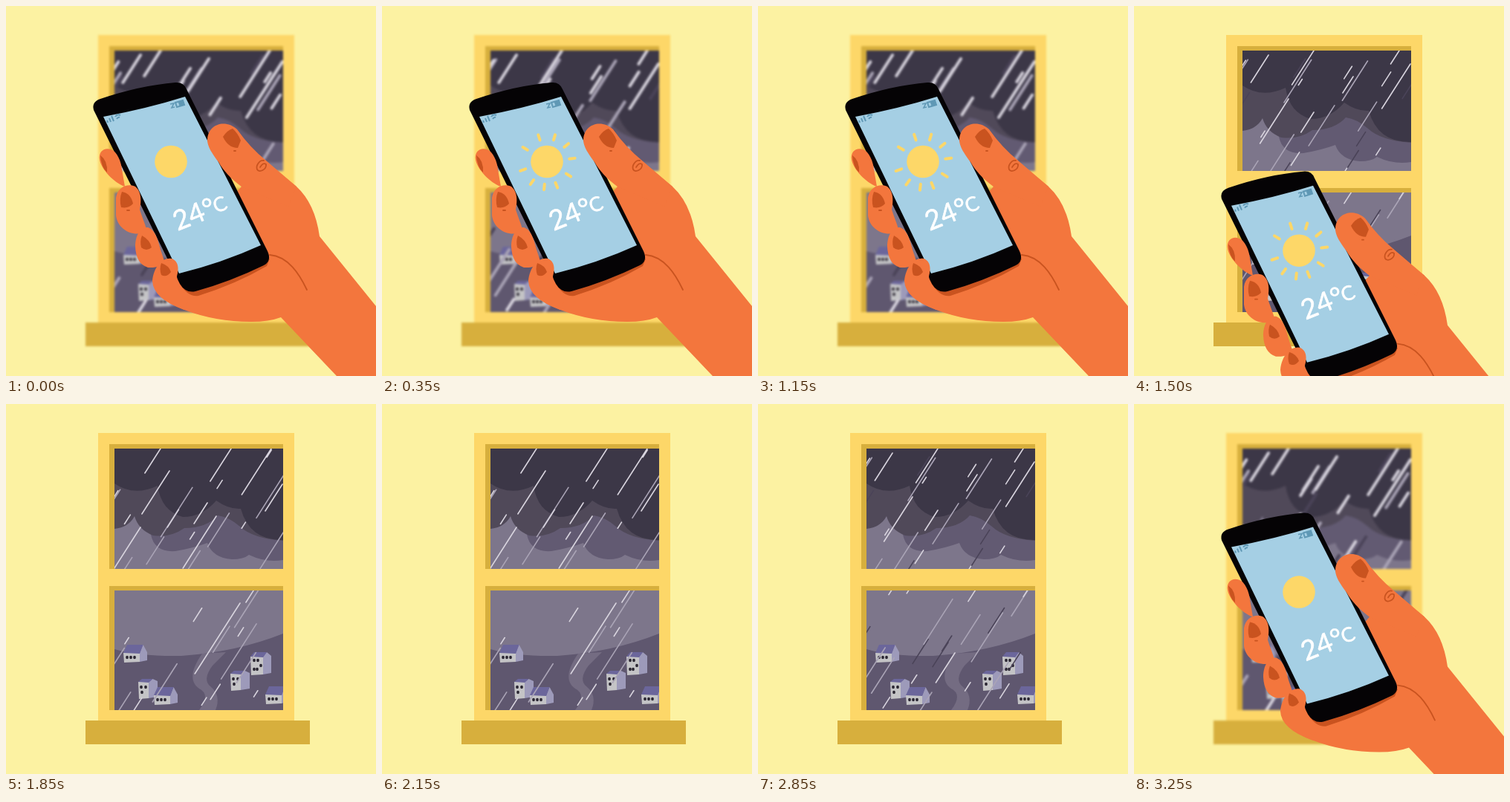
An HTML page that plays this animation: 498 px wide and 498 px high, repeating every 3300 ms.

```html
<!DOCTYPE html>
<html lang="en">
<head>
<meta charset="utf-8">
<title>Weather check</title>
<style>
  html, body { margin: 0; width: 100%; height: 100%; overflow: hidden; background: #fcf2a2; }
  svg { display: block; width: 100vw; height: 100vh; }
  text { font-family: Lato, "Open Sans", sans-serif; fill: #fff; stroke: #fff; stroke-width: .6; }
</style>
</head>
<body>
<svg viewBox="0 0 498 498">
  <defs>
    <clipPath id="glass"><path d="M146 60H373V222H146ZM146 251H373V412H146Z"/></clipPath>
    <filter id="soft" filterUnits="userSpaceOnUse" x="90" y="20" width="340" height="460" color-interpolation-filters="sRGB">
      <feGaussianBlur id="blur" stdDeviation="0"/>
    </filter>
  </defs>
  <rect width="498" height="498" fill="#fcf2a2"/>

  <g id="window">
    <path fill="#fdd768" d="M124 39H388V427H124Z"/>
    <path fill="#d7af3d" d="M139 54H373V222H139ZM139 245H373V412H139ZM107 426H409V458H107Z"/>
    <g clip-path="url(#glass)">
      <path fill="#7d768b" d="M146 60H373V412H146Z"/>
      <path fill="#625a72" d="M190 150L195 176Q200 200 228 198Q252 194 271 187Q278 207 304 209Q320 209 327 203Q350 214 373 210V130H240Z"/>
      <path fill="#504959" d="M146 60V168Q165 166 173 151Q178 169 198 177Q222 180 240 167Q270 167 285 150Q300 152 315 165Q332 181 373 184V60Z"/>
      <path fill="#3c3747" d="M146 60V107Q172 125 204 110Q209 144 238 152Q264 152 283 130Q300 142 316 141Q328 184 373 183V60Z"/>
      <path fill="#5f576f" d="M146 330Q180 340 236 339Q310 334 373 309V412H146Z"/>
      <path fill="#746c82" d="M264 336C250 356 246 373 260 383Q276 391 260 412H282Q290 392 275 380Q264 371 278 352L296 334Z"/>
      <g id="houses"></g>
      <g id="rain" fill="none" stroke-linecap="round">
        <path id="darkRain" stroke="#4a4358"/>
        <path id="dimRain" stroke="#aaa4b6"/>
        <path id="lightRain" stroke="#d8d4de"/>
      </g>
    </g>
  </g>

  <g id="hand">
    <path fill="#f3763d" d="M198 370Q204 395 240 409Q282 425 330 425Q354 425 370 419L445 498L700 768V645L498 404L422 310Q416 266 391 243L372 228L317 243L240 330Z"/>
    <path fill="#c9531f" d="M234 374Q245 392 259 390Q310 374 351 350L355 340Z"/>
    <path fill="#050305" d="M118 140Q115 129 127 125Q180 107 228 103Q239 102 243 112L352 330Q358 343 347 349Q302 371 255 384Q242 387 234 374Z"/>
    <path fill="#a5cfe4" d="M131 149Q190 138 241 122L343 322Q290 346 233 360Z"/>
    <g stroke="#5f98b5" stroke-width="2" fill="none">
      <path d="M137 157L136 154M141 156L139 151M145 155L142 148M147 149Q150 145 154 147M149 152Q151 149 153 150"/>
      <path d="M221 132L226 131L223 137L227 136" stroke-width="1.5"/>
      <path d="M228 130L238 127L240 133L230 136Z"/>
      <path d="M233 130L237 129L238 132L234 133Z" fill="#5f98b5"/>
    </g>
    <circle cx="222" cy="209.5" r="21.8" fill="#fdd768"/>
    <path id="rays" fill="none" stroke="#fdd768" stroke-width="4" stroke-linecap="round"/>
    <g transform="translate(231 303) rotate(-22)">
      <text font-size="37">24°</text>
      <text x="57" y="-2.5" font-size="27">C</text>
    </g>
    <g fill="#f3763d">
      <path d="M126 207C124 195 133 190 141 193C150 196 155 210 156 220L160 243C145 238 128 219 126 207Z"/>
      <path d="M148 258C150 243 165 238 174 243C183 250 182 264 180 274C184 287 190 299 189 304C170 312 150 300 148 282Z"/>
      <path d="M174 324C174 307 182 297 191 298C201 301 205 316 208 328L213 343Q209 353 191 352Q175 347 174 324Z"/>
      <path d="M197 370C199 350 211 338 223 340C234 344 232 357 230 364C231 377 238 386 248 390L240 409Q198 394 197 370Z"/>
      <path d="M318 244C302 232 293 222 286 210C277 198 271 189 271 180C272 158 296 152 311 166Q328 190 350 208L391 243L380 270Z"/>
    </g>
    <g fill="#c9531f">
      <path d="M127 201Q137 208 136 224Q128 217 127 201Z"/>
      <path d="M156 250Q168 252 171 266Q165 273 155 271Q152 260 156 250Z"/>
      <path d="M183 309Q194 315 196 325Q189 331 182 325Q180 316 183 309Z"/>
      <path d="M209 346Q219 349 222 358Q216 366 209 362Q206 354 209 346Z"/>
      <path d="M292 176Q298 167 305 165Q312 171 316 181L312 191Q299 191 292 176Z"/>
    </g>
    <path fill="none" stroke="#c9531f" stroke-width="1.8" stroke-linecap="round" d="M355 335C380 337 395 361 405 382M347 208C341 207 336 215 338 220C341 225 351 220 350 213Q346 210 342 217M307 195H309M163 275H166"/>
  </g>
</svg>
<script>
const LOOP = 3300;
const $ = id => document.getElementById(id);
const clamp = v => Math.min(1, Math.max(0, v));
const span = (t, from, to) => clamp((t - from) / (to - from));

function seeded(seed) {
  return () => (seed = (seed * 16807) % 2147483647) / 2147483647;
}

const line = (x, y, h) => `M${x} ${y}l${-.64 * h} ${h}`;

// Drops scattered evenly over both panes, one per grid cell.
function scatter(seed, cols, rows, shortest, longest) {
  const random = seeded(seed);
  let d = "";
  for (let i = 0; i < cols * rows; i++) {
    const x = 150 + (i % cols + random()) * 240 / cols;
    const y = 60 + (Math.floor(i / cols) + random()) * 340 / rows;
    d += line(x, y, shortest + random() * (longest - shortest));
  }
  return d;
}

// The main streaks of each rain picture: top x, top y, height.
const mainStreaks = [
  [[181,66,37], [242,60,46], [295,95,22], [357,60,18], [372,78,60], [242,143,27], [208,125,60], [265,335,40]],
  [[208,60,33], [220,90,58], [303,60,44], [357,60,62], [372,108,36], [271,133,28], [181,166,56], [283,151,70], [315,268,95]],
  [[181,66,37], [208,60,34], [273,71,44], [248,84,32], [355,60,62], [372,75,75], [356,90,12]]
];
const rain = mainStreaks.map((list, i) => ({
  light: list.map(s => line(...s)).join("") + scatter(731 + i * 977, 4, 4, 7, 24),
  dim: scatter(5209 + i * 613, 3, 5, 35, 75),
  dark: scatter(8839 + i * 421, 3, 4, 18, 36)
}));

// Front wall w × h with a side wall of depth d, and windows at offsets.
function house(x, y, w, h, d, rise, dots) {
  const peak = x + w + d * .45;
  const windows = dots.map(([a, b]) => `<ellipse cx="${x + a}" cy="${y + b}" rx="1.9" ry="2.2" fill="#2b2733"/>`).join("");
  return `<path fill="#c4c4c6" d="M${x} ${y}h${w}v${h}l${-w + 1} 1Z"/>
    <path fill="#9d9aba" d="M${x + w} ${y}L${peak} ${y - rise}L${x + w + d} ${y - 1}v${h - 1}l${-d} 2Z"/>
    <path fill="#6b669b" d="M${x} ${y}l5 ${-rise}H${peak}L${x + w} ${y + 1}Z"/>${windows}`;
}
const cottage = (x, y) => house(x, y, 22, 12, 10, 11, [[5, 6], [10, 6], [15, 6]]);
const tower = (x, y) => house(x, y, 14, 22, 12, 4, [[4, 7], [10, 7], [5, 14]]);
$("houses").innerHTML =
  cottage(158, 335) + tower(178, 374) + cottage(199, 392) + tower(302, 363) +
  house(329, 340, 17, 24, 11, 6, [[5, 5], [10, 5], [14, 12], [5, 17], [9, 17]]) +
  cottage(349, 391);

const rayAngles = [-108, -73, -40, -7, 32, 68, 96, 126, 161, 211];
function raysPath(grow) {
  if (!grow) return "";
  const inner = 30.5, outer = inner + 8 * grow;
  return rayAngles.map(deg => {
    const a = deg * Math.PI / 180, c = Math.cos(a), s = Math.sin(a);
    return `M${222 + inner * c} ${209.5 + inner * s}L${222 + outer * c} ${209.5 + outer * s}`;
  }).join("");
}

function handOffset(t) {
  if (t < 2000) return 400 * span(t, 1200, 1650) ** 3;
  return 400 * (1 - span(t, 2850, 3300));
}

function render(t) {
  const offset = handOffset(t);
  $("hand").setAttribute("transform", `translate(0 ${offset})`);
  $("hand").style.display = offset < 400 ? "" : "none";

  const blur = t < 2000 ? 1 - span(t, 1150, 1450) : span(t, 2850, 3200);
  $("blur").setAttribute("stdDeviation", 1.7 * blur);
  if (blur) $("window").setAttribute("filter", "url(#soft)");
  else $("window").removeAttribute("filter");

  const phase = t < 1150 ? (2 + Math.floor(t / 75)) % 3 : Math.floor(t / 50) % 3;
  const drops = rain[phase];
  const showDark = phase !== 1 || t < 1650 || t >= 2200;
  $("lightRain").setAttribute("d", drops.light);
  $("dimRain").setAttribute("d", drops.dim);
  $("darkRain").setAttribute("d", showDark ? drops.dark : "");
  $("rain").setAttribute("stroke-width", 1.6 + 2.4 * blur);

  const grow = t < 2000 ? 1 - (1 - span(t, 100, 450)) ** 2 : 0;
  $("rays").setAttribute("d", raysPath(grow));
}

const start = performance.now();
function tick() {
  render((performance.now() - start) % LOOP);
  requestAnimationFrame(tick);
}
tick();
</script>
</body>
</html>
```
